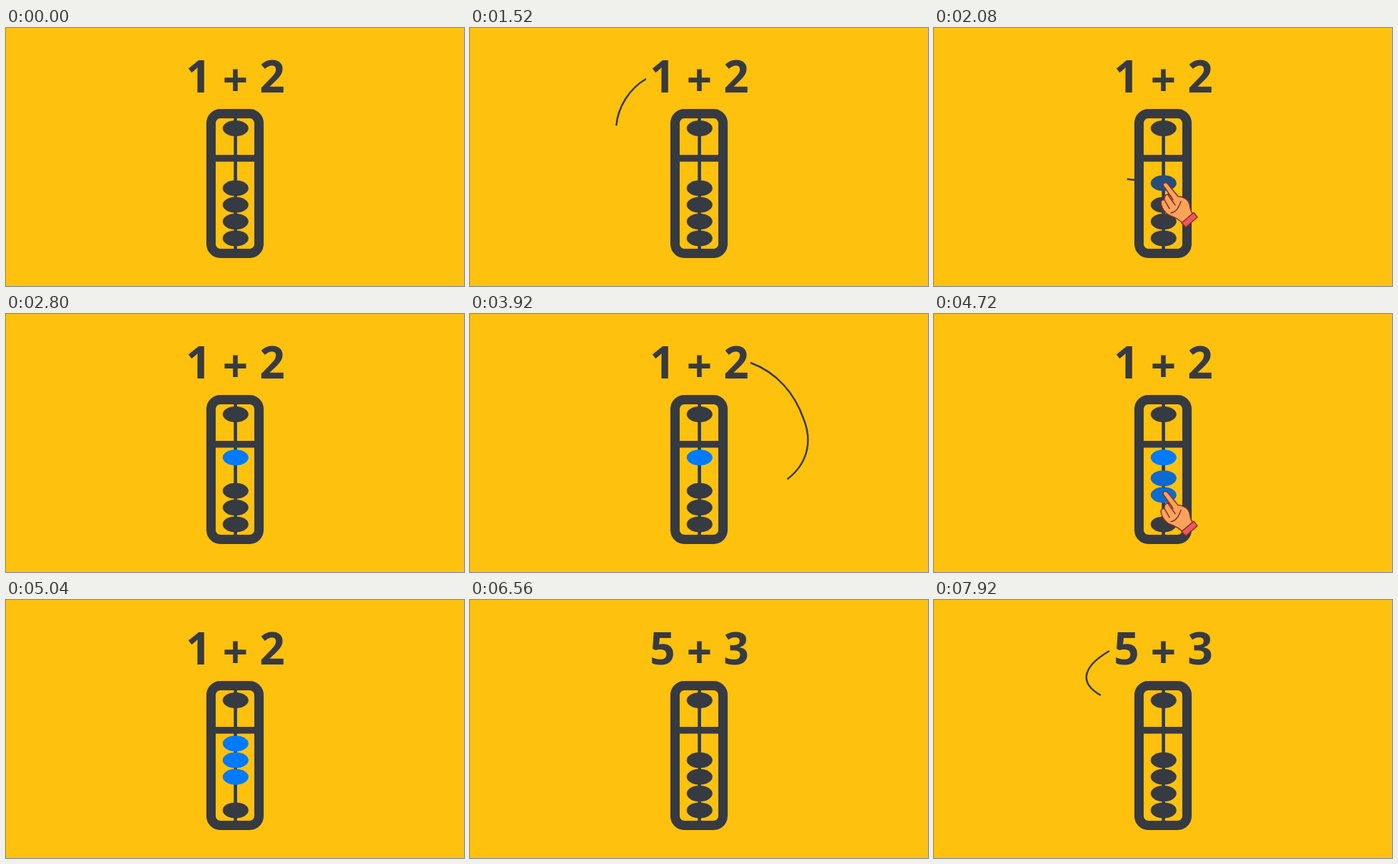
These frames come from a looping animation (640 by 360 pixels, 8 s). An HTML page:

```html
<!DOCTYPE html>
<html lang="en">
<head>
<meta charset="utf-8">
<title>Abacus sums</title>
<style>
  html, body { margin: 0; width: 100%; height: 100%; overflow: hidden; background: #fec10d; }
  svg { display: block; width: 100vw; height: 100vh; }
  text { font: 700 62px "Noto Sans", "Open Sans", sans-serif; text-anchor: middle; fill: #363a42; }
  .bead, .bar { fill: #363a42; }
  .frame, .trail { fill: none; stroke: #363a42; }
  .frame { stroke-width: 13; }
  .trail { stroke-width: 2.5; }
  .hand { stroke: #82301f; stroke-width: 1.5; stroke-linejoin: round; stroke-linecap: round; }
</style>
</head>
<body>
<svg viewBox="0 0 640 360">
  <rect width="640" height="360" fill="#fec10d"/>
  <text id="left" x="269" y="90">1</text>
  <text x="320.5" y="95">+</text>
  <text id="right" x="372" y="90">2</text>

  <path class="trail" pathLength="1" d="M246 71C188 105 182 205 281 212"/>
  <path class="trail" pathLength="1" d="M392 68C430 82 454 112 466 146C490 206 442 252 360 258"/>
  <path class="trail" pathLength="1" d="M245 71C204.500 95 204.500 117 233 133"/>

  <rect class="bar" x="318.300" y="120" width="4.600" height="195"/>
  <rect class="bar" x="288" y="177" width="64" height="9.500"/>
  <rect class="frame" x="286.500" y="119.500" width="67" height="195" rx="13"/>
  <ellipse class="bead" cx="320.800" cy="140" rx="18" ry="11"/>
  <g id="beads"></g>

  <g id="hand" class="hand">
    <path fill="#fba35c" d="M320.500 219C319 215 324 213 327 217L341 234C348 234 355 238 357 245C358 250 358 254 362 259L348 272C341 264 333 262 328 260C323 257 319 251 318 247C316 241 318 238 322 239C321 232 327 228 331 234Z"/>
    <path fill="none" d="M331 234L334 239M322 239L329 251M327 232L337 246M331 257C339 256 342 249 345 241"/>
    <path fill="#ee5762" d="M346 271L363 256.500L368 263L352 277Z"/>
  </g>
</svg>
<script>
  const LOOP = 8000, STEP = 80, RESET = 6560;
  const DARK = [54, 58, 66], BLUE = [0, 122, 255];
  const REST = 223.5, GAP = 23.3;
  const $ = id => document.getElementById(id);

  const ramp = (t, from, to) => Math.min(1, Math.max(0, (t - from) / (to - from)));
  const smooth = x => x * x * (3 - 2 * x);
  const mix = p => `rgb(${DARK.map((c, i) => Math.round(c + (BLUE[i] - c) * p))})`;

  // Each push moves some beads up while the hand follows.
  const pushes = [
    { at: 1840, handY: 7, travel: 33 },
    { at: 4080, handY: 58, travel: 31 }
  ];
  const owner = [0, 1, 1];

  const trails = [...document.querySelectorAll('.trail')];
  const spans = [
    { head: [1310, 1840], tail: [1840, 2120] },
    { head: [3550, 4080], tail: [4150, 4550] },
    { head: [7700, 7920], tail: [LOOP, LOOP + 1] }
  ];

  const beads = [0, 1, 2, 3].map(i => {
    const e = document.createElementNS('http://www.w3.org/2000/svg', 'ellipse');
    const set = { class: 'bead', cx: 320.8, cy: REST + GAP * i, rx: 18, ry: 11 };
    for (const k in set) e.setAttribute(k, set[k]);
    return $('beads').appendChild(e);
  });

  function lift(t, start) {
    if (t >= RESET) return 0;
    const x = ramp(t, start, start + 880);
    return x + 0.04 * Math.sin(Math.PI * x);
  }

  function draw(t) {
    const second = t >= RESET;
    $('left').textContent = second ? '5' : '1';
    $('right').textContent = second ? '3' : '2';

    owner.forEach((n, i) => {
      const p = lift(t, pushes[n].at);
      beads[i].setAttribute('cy', REST + GAP * (i - p));
      beads[i].style.fill = mix(p);
    });

    trails.forEach((path, i) => {
      const { head, tail } = spans[i];
      const a = smooth(ramp(t, ...tail)), b = ramp(t, ...head);
      path.style.display = b > a ? '' : 'none';
      path.style.strokeDasharray = `0 ${a} ${b - a} 2`;
    });

    const push = pushes.find(p => t >= p.at && t < p.at + 960);
    $('hand').style.display = push ? '' : 'none';
    if (push) {
      const y = push.handY - push.travel * smooth(ramp(t, push.at, push.at + 880));
      $('hand').setAttribute('transform', `translate(0 ${y})`);
    }
  }

  function tick() {
    draw(Math.floor(performance.now() % LOOP / STEP) * STEP);
    requestAnimationFrame(tick);
  }
  tick();
</script>
</body>
</html>
```
